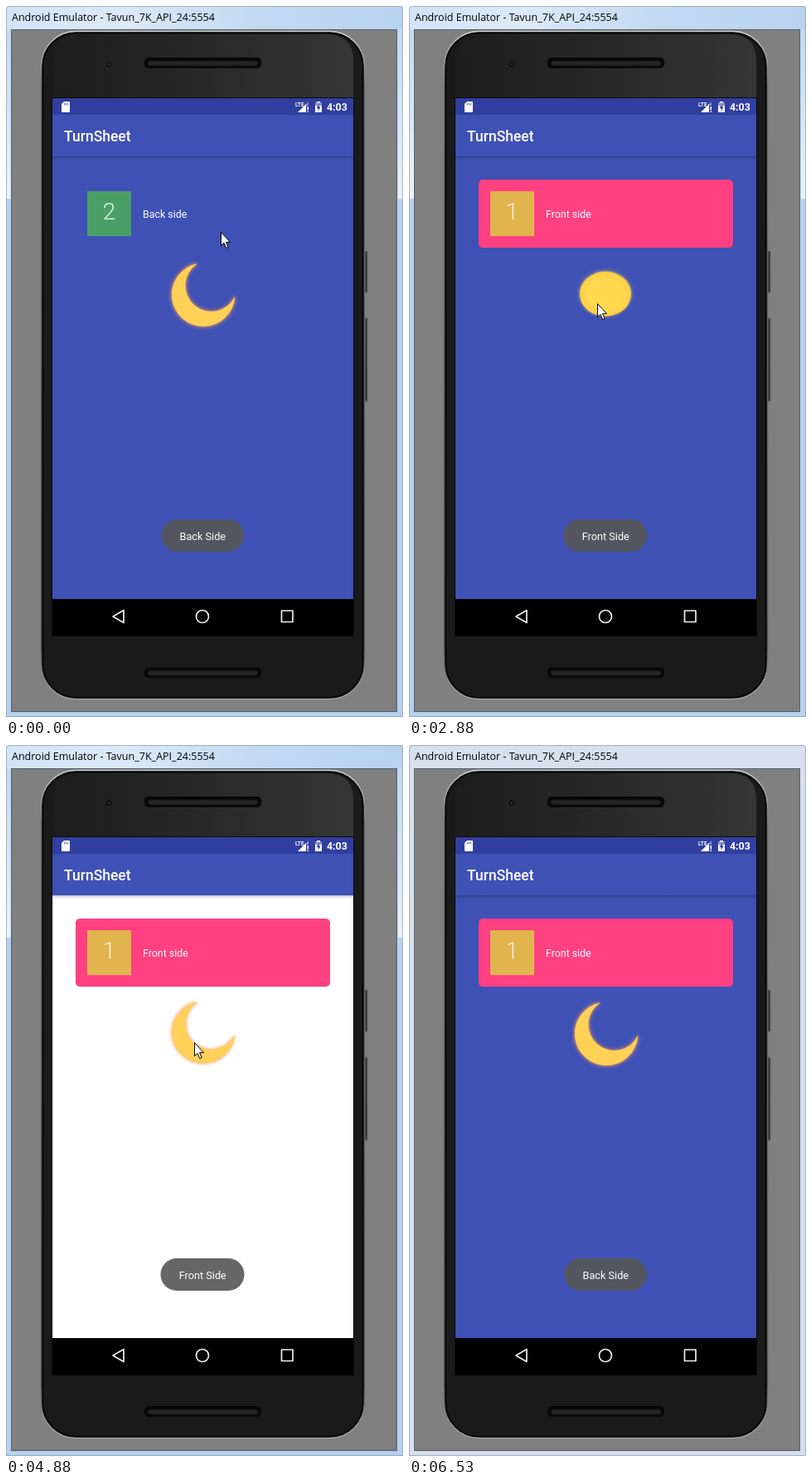
Write an HTML page that moves like this. It is 479x856 px and loops after 6660 ms.

```html
<!DOCTYPE html>
<html lang="en">
<head>
<meta charset="utf-8">
<title>Card flip</title>
<style>
  html, body { margin: 0; width: 100%; height: 100%; overflow: hidden; }
  body { position: relative; font-family: Roboto, sans-serif; }
  svg, .flip, #sheet { position: absolute; left: 0; top: 0; overflow: visible; }
  #sheet { left: 56px; top: 181px; width: 363px; height: 532.5px; background: #3f51b5; }
  #sheet::before {
    content: ""; position: absolute; width: 100%; height: 5px;
    background: linear-gradient(rgba(0, 0, 0, .24), rgba(0, 0, 0, .09) 45%, transparent);
  }
  #card { left: 84px; top: 209px; width: 307px; height: 82px; border-radius: 5px; color: #fff; }
  #card.front { background: #ff4081; }
  #tile {
    position: absolute; left: 14px; top: 14px; width: 53px; height: 53.5px; background: #4a9f66;
    color: #eaf3e6; font-size: 28px; font-weight: 300; line-height: 49px; text-align: center;
  }
  .front #tile { background: #e2b44e; }
  #label { position: absolute; left: 81px; top: 34px; font-size: 12.4px; line-height: 16px; white-space: nowrap; }
  #picture { left: 194px; top: 306px; width: 86px; height: 86px; }
</style>
</head>
<body>
<svg width="479" height="856" viewBox="0 0 479 856">
  <defs>
    <linearGradient id="title">
      <stop offset="0" stop-color="#d3e4f6"/><stop offset=".3" stop-color="#dce9f7"/>
      <stop offset=".62" stop-color="#c3daf2"/><stop offset="1" stop-color="#b8d2ef"/>
    </linearGradient>
    <linearGradient id="side" x2="0" y2="1">
      <stop offset="0" stop-color="#c3daf2"/><stop offset="1" stop-color="#e9f2fb"/>
    </linearGradient>
    <linearGradient id="gloss">
      <stop offset="0" stop-color="#1d1d1d"/><stop offset=".5" stop-color="#282828"/>
      <stop offset="1" stop-color="#363636"/>
    </linearGradient>
    <linearGradient id="rim" x2="0" y2="1">
      <stop offset="0" stop-color="#d0d0d0"/><stop offset=".08" stop-color="#6c6c6c"/>
      <stop offset=".92" stop-color="#555"/><stop offset="1" stop-color="#aaa"/>
    </linearGradient>
    <g id="speaker">
      <rect width="141" height="13" rx="5" fill="#080808"/>
      <rect x="4" y="4" width="133" height="6" rx="3" fill="#252525" stroke="#111"/>
    </g>
  </defs>

  <!-- Window -->
  <rect width="479" height="856" fill="#b7d2f0"/>
  <g id="active">
    <rect width="479" height="28" fill="url(#title)"/>
    <path d="M0 28H6V232H0ZM473 28H479V232H473Z" fill="url(#side)"/>
  </g>
  <rect id="inactive" width="479" height="856" fill="#d6e1ed"/>
  <path d="M.5 856V5Q.5 .5 5 .5H474Q478.500 .5 478.500 5V855.500H.5" fill="none" stroke="#7d91a6" stroke-opacity=".6"/>
  <rect x="6.500" y="28.500" width="465" height="821" fill="#808080" stroke="#56606b"/>
  <text x="7" y="18" font-family="Open Sans, sans-serif" font-size="12.5">Android Emulator - Tavun_7K_API_24:5554</text>

  <!-- Phone -->
  <path d="M433 295H436V345H433ZM433 376H436V476H433Z" fill="#303030" stroke="#666"/>
  <rect x="42.500" y="30.500" width="390" height="804" rx="42" fill="#1a1a1a" stroke="url(#rim)" stroke-width="1.500"/>
  <rect x="44.500" y="32.500" width="386" height="800" rx="40" fill="none" stroke="#050505" stroke-width="1.500"/>
  <path d="M56 111V55Q66 34 88 34H386Q419 34 419 66V111Z" fill="url(#gloss)"/>
  <circle cx="124" cy="70" r="3.500" fill="#101015"/><circle cx="124" cy="70" r="1.200" fill="#343c4b"/>
  <use href="#speaker" x="167" y="62"/><use href="#speaker" x="167" y="796"/>
  <rect x="55" y="110" width="365" height="649" fill="#0a0a0a"/>
  <rect x="56" y="111" width="363" height="20.500" fill="#303f9f"/>
  <rect x="56" y="131" width="363" height="51" fill="#3f51b5"/>
  <rect x="56" y="713" width="363" height="45"/>

  <!-- Status bar, app title, navigation -->
  <g fill="#fff">
    <path d="M70 115H76Q77 115 77 116V127Q77 128 76 128H68Q67 128 67 127V118Z"/>
    <path d="M70.500 117V119.500M72.500 117V119.500M74.500 117V119.500" stroke="#303f9f" stroke-width=".8"/>
    <text x="349" y="121" font-size="6.500" font-weight="700">LTE</text>
    <path d="M352 128L362 118V128Z"/>
    <path d="M361 119L365 115V120H362V128H361Z" opacity=".4"/>
    <path d="M363.500 121H365V125.500H363.500ZM363.500 126.500H365V128H363.500Z"/>
    <path d="M375 115H379V116.500H381V128H373V116.500H375Z"/>
    <path d="M373 116.500H381V120H373Z" fill="#303f9f" opacity=".55"/>
    <path d="M377.800 118L374.500 123H376.500V126.500L379.700 121.500H377.800Z" fill="#303f9f"/>
    <text x="387" y="126" font-size="12.400" font-weight="700">4:03</text>
    <text x="70" y="163" font-size="17.500" font-weight="500">TurnSheet</text>
  </g>
  <g fill="none" stroke="#eee" stroke-width="1.700" stroke-linejoin="round">
    <path d="M129 735L142 727.500V742.500Z"/><circle cx="237" cy="735" r="7.500"/>
    <rect x="332.500" y="728" width="13.500" height="13.500"/>
  </g>
</svg>

<div id="sheet"></div>
<div id="card" class="flip"><div id="tile"></div><div id="label"></div></div>
<div id="picture" class="flip">
  <svg width="86" height="86" viewBox="194 306 86 86">
    <defs>
      <filter id="blur" x="-30%" y="-30%" width="160%" height="160%"><feGaussianBlur stdDeviation="2.300"/></filter>
      <radialGradient id="disc">
        <stop offset=".7" stop-color="#ffd850"/><stop offset="1" stop-color="#fccf43"/>
      </radialGradient>
      <path id="crescent" d="M230 310.500A38 38 0 1 0 276 350.500A31.500 31.500 0 1 1 230 310.500Z"/>
    </defs>
    <g id="moon">
      <use href="#crescent" fill="#f39a5c" stroke="#f39a5c" stroke-width="2" filter="url(#blur)" opacity=".85"/>
      <use href="#crescent" fill="#ffd257" stroke="#fbc45a" stroke-width=".7"/>
    </g>
    <g id="sun">
      <circle cx="237" cy="349" r="32.500" fill="#ffd95a" filter="url(#blur)" opacity=".55"/>
      <circle cx="237" cy="349" r="32" fill="url(#disc)"/>
    </g>
  </svg>
</div>

<svg width="479" height="856" viewBox="0 0 479 856">
  <rect id="pill" y="618" height="39" rx="19.500" fill="#575757" fill-opacity=".906"/>
  <text id="toast" x="237.300" y="643" font-size="12.700" fill="#fff" text-anchor="middle"></text>
  <path id="cursor" d="M.5 .5V16.500L4 13.200L6.800 19.500L9.200 18.400L6.500 12.300H11.500Z" fill="#fff" stroke="#000"/>
</svg>

<script>
const LOOP = 6660;
const $ = id => document.getElementById(id);

// Each entry holds until the next one: [start in ms, value...]
const cardTurn = [[0, 0], [530, 15], [680, 100], [830, 160], [980, 179], [1110, 180]];
const pictureTurn = [[0, 0], [2640, 22], [2760, 84], [2880, 150], [3030, 180],
                     [4610, 236], [4760, 302], [4880, 348], [5030, 360]];
const cursorPath = [[0, 259, 272], [1260, 257, 274], [1410, 248, 300], [1560, 238, 325], [1680, 230, 346],
                    [1800, 227, 355], [1950, 227, 358], [5460, 320, 510], [5580, 411, 665],
                    [5730, 467, 804], [5850, 500, 870]];

const held = (steps, t) => steps.findLast(step => step[0] <= t).slice(1);
const between = (t, from, to) => t >= from && t < to;
const show = (el, on) => { el.style.visibility = on ? "visible" : "hidden"; };

// Rotates around the horizontal axis while sinking back; returns true when the reverse face shows.
function flip(el, turn, depth) {
  const angle = (turn + 90) % 180 - 90;
  const sink = depth * Math.abs(angle) / 90;
  el.style.transform = angle ? `perspective(170px) translateZ(${-sink}px) rotateX(${angle}deg)` : "none";
  return between(turn, 90, 270);
}

function draw(t) {
  const front = flip($("card"), held(cardTurn, t)[0], 26);
  $("card").classList.toggle("front", front);
  $("tile").textContent = front ? "1" : "2";
  $("label").textContent = front ? "Front side" : "Back side";

  const day = flip($("picture"), held(pictureTurn, t)[0], 18);
  show($("sun"), day);
  show($("moon"), !day);
  $("sheet").style.backgroundColor = between(t, 3030, 5030) ? "#fff" : "#3f51b5";

  const frontToast = between(t, 1260, 5310);
  $("toast").textContent = frontToast ? "Front Side" : "Back Side";
  $("pill").setAttribute("x", frontToast ? 186.5 : 187.5);
  $("pill").setAttribute("width", frontToast ? 101 : 99.5);

  const inactive = t >= 6530;
  show($("inactive"), inactive);
  show($("cursor"), !inactive);
  $("cursor").setAttribute("transform", `translate(${held(cursorPath, t)})`);
}

const start = performance.now();
function tick() {
  draw((performance.now() - start) % LOOP);
  requestAnimationFrame(tick);
}
tick();
</script>
</body>
</html>
```
